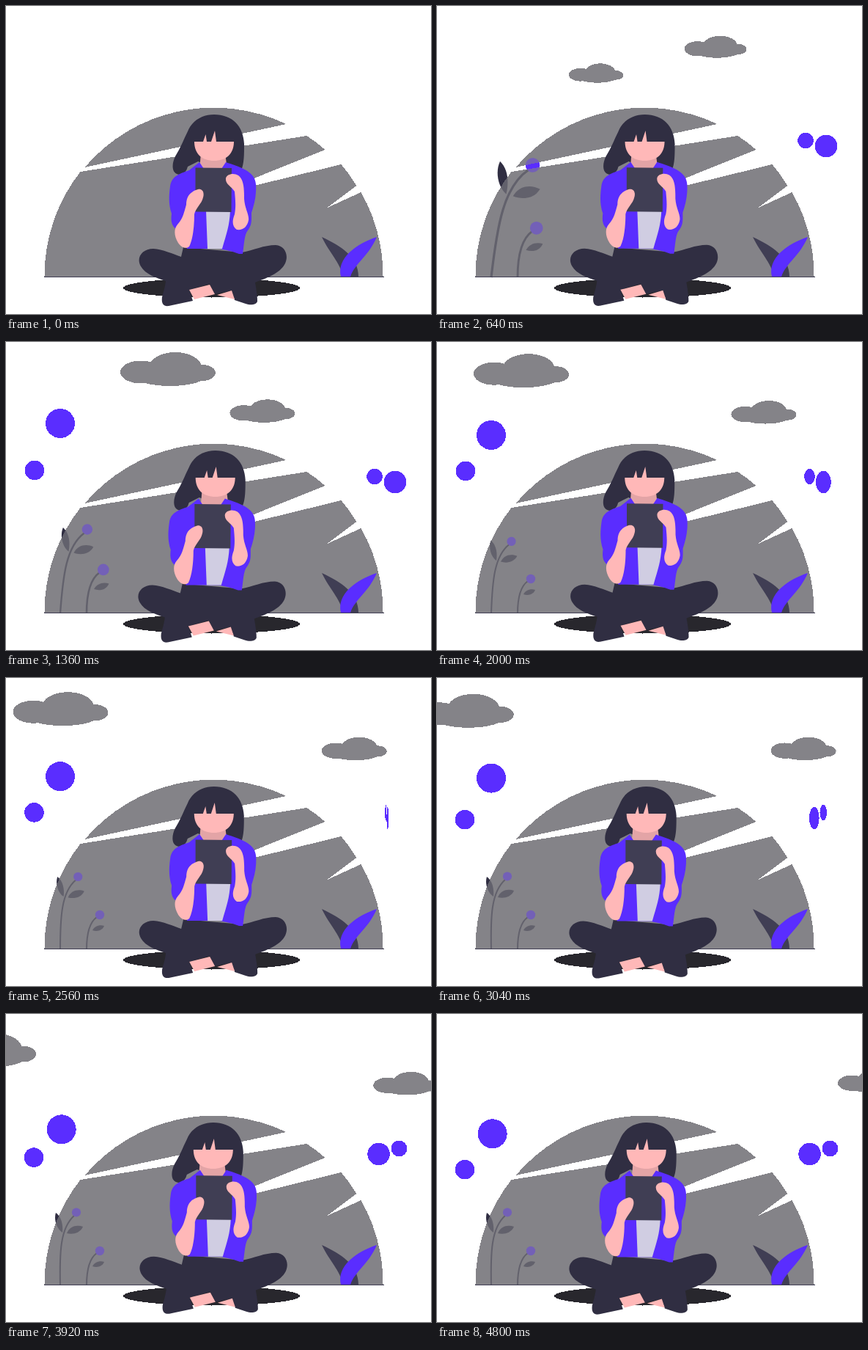
An HTML page for the animation above (4.88 s loop, 580x420 px).

```html
<!DOCTYPE html>
<html lang="en">
<head>
<meta charset="utf-8">
<title>Reading outdoors</title>
<style>
html, body { margin: 0; width: 100%; height: 100%; overflow: hidden; background: #fff; }
svg { display: block; width: 100vw; height: 100vh; }
.gray { fill: #848388; }
.violet { fill: #5a2dff; }
.dark { fill: #302e42; }
.slate { fill: #403e54; }
.skin { fill: #ffb8b8; }
.stem { fill: none; stroke: #302e42; stroke-width: 2; }
.crisp { shape-rendering: crispEdges; }
</style>
</head>
<body>
<svg viewBox="0 0 580 420" preserveAspectRatio="xMidYMid meet">
  <defs>
    <path id="hill" class="gray crisp" transform="translate(-.5 0)" d="M53 369.5A231 231 0 0 1 102 226L411 177A231 231 0 0 1 436 196L274 261L458 216A231 231 0 0 1 479 245L439 275L485 254A231 231 0 0 1 515 369.5ZM108 220A231 231 0 0 1 383 161Z"/>
    <g id="cloud" class="gray crisp">
      <ellipse cx="-37" cy="4" rx="28" ry="15.5"/>
      <ellipse cx="10" cy="-2" rx="36" ry="21"/>
      <ellipse cx="3" cy="8" rx="50" ry="15"/>
      <ellipse cx="47" cy="5" rx="18" ry="11"/>
    </g>
  </defs>

  <use id="cloudA" href="#cloud"/>
  <use id="cloudB" href="#cloud"/>

  <use href="#hill"/>
  <g id="tall">
    <path class="stem" d="M0 0C-1 -45 0 -78 19 -95"/>
    <path class="dark" d="M3 -72C-5 -77 -9 -90 -6 -99C2 -93 4 -82 3 -72Z"/>
    <path class="dark" d="M9 -71C13 -81 23 -83 31 -80C27 -71 17 -69 9 -71Z"/>
    <circle class="violet" cx="22" cy="-99.5" r="6.1"/>
  </g>
  <g id="short">
    <path class="stem" d="M0 0C0 -22 4 -37 14 -44"/>
    <path class="dark" d="M8 -26C11 -32 18 -34 24 -32C21 -25 14 -24 8 -26Z"/>
    <circle class="violet" cx="18" cy="-47" r="6.2"/>
  </g>
  <use href="#hill" opacity=".6"/>

  <path class="slate" d="M431 315C457 327 481 342 481 369H460C456 350 441 336 431 315Z"/>
  <path class="violet" d="M506 315C478 324 451 344 457 369H470C476 351 495 341 506 315Z"/>
  <path d="M52 369.5H516" stroke="#403e54"/>
  <ellipse class="crisp" cx="280.5" cy="384.5" rx="120.5" ry="13" fill="#28272d"/>

  <circle id="ballA" class="violet crisp" r="20"/>
  <circle id="ballB" class="violet crisp" r="13.3"/>
  <g id="pair" class="violet crisp">
    <circle cx="-16.7" cy="-4" r="10.8"/>
    <circle cx="11.2" cy="3.5" r="15.3"/>
  </g>

  <g id="body">
    <g id="head">
      <path class="dark" d="M284 148C309 148 324 164 325 188C325 203 325 215 321 224L300 226L262 212L248 219Q246 228 238 230C225 230 226 215 231 205C238 194 242 183 248 171C254 156 268 148 284 148Z"/>
      <path fill="#e3a4a6" d="M266 200H299L302 224H264Z"/>
      <path class="skin" d="M257 185H269L272.5 175L274 185H280L285 170L287 185H311C311 202 300 211 284 211C268 211 257 202 257 185Z"/>
    </g>
    <path class="dark" d="M242 329L322 336C338 333 352 326 368 326C381 327 386 340 381 351C374 365 355 371 340 377C342 388 343 396 343 403C341 408 333 408 327 406L312 401L308 388L284 393L278 379L250 387L255 402L222 409C214 410 212 405 213 397C215 389 217 384 218 375C206 371 190 366 184 355C177 343 186 331 201 331C214 332 228 338 239 342Z"/>
    <path class="skin" d="M250 387L278 380L285 393L257 400ZM288 394L308 388L312 400Z"/>
    <path class="violet" d="M264 213L282 240L300 213C318 219 340 225 341 243C342 258 339 270 335 282C335 292 336 298 330 306C325 312 325 326 323 338H318C308 334 300 333 292 331H247C242 320 240 310 232 304C225 299 225 291 226 283C222 272 222 260 224 246C226 232 236 229 250 224Z"/>
    <path class="skin" d="M264 219H301L303 224H262Z" fill-opacity="0"/>
    <path fill="#d0cde2" d="M273 279H306C305 300 301 310 295 331H275Z"/>
    <path class="slate" d="M258.5 220.5L308 221L307.5 281L258.5 280.5Z"/>
    <path class="skin" d="M262 250C268 249 271 254 269 261C267 270 259 275 257 284C257 301 255 318 250 328C245 332 239 329 235 323C229 313 229 304 234 298C242 289 243 281 246 271C246 259 252 253 262 250Z"/>
    <path class="skin" d="M300 235C301 229 311 227 317 231C325 237 325 250 325 263C326 277 332 284 331 292C329 302 323 306 315 305C309 301 308 294 312 284C314 273 313 264 312 253C308 246 299 243 300 235Z"/>
  </g>
</svg>
<script>
const LOOP = 4880, STEP = 80, SWAY = 1720;
const put = (id, x, y, sx = 1, sy = sx, rot = 0) =>
  document.getElementById(id).setAttribute('transform',
    `translate(${x} ${y}) rotate(${rot}) scale(${sx} ${sy})`);
const ramp = (t, a, b) => Math.max(0, Math.min(1, (t - a) / (b - a)));
const ease = (t, a, b) => { const u = ramp(t, a, b); return u * u * (3 - 2 * u); };

// Slowing entrance until 2 s, then a steady drift
function drift(t, x, speed, curve, slow) {
  const d = t - 2000;
  return x + (d < 0 ? speed * d + curve * d * d : slow * d);
}

function drawClouds(t) {
  const ay = 56 - 19 * ease(t, 600, 1140) + .0054 * Math.max(0, t - 1600);
  put('cloudA', drift(t, 115, -.1396, .0000406, -.0724), ay, ramp(t, 80, 940));
  const by = 91.5 + 5 * Math.sin(Math.PI * ramp(t, 640, 4800));
  put('cloudB', drift(t, 446, .1337, -.0000255, .052), by, .685 * ramp(t, 80, 750));
}

function drawBalls(t, wave) {
  const pop = ease(t, 640, 1120), fall = Math.max(0, t - 1360);
  const bob = fall ? 1 - wave : 0;
  put('ballA', 74 + 1.7 * ease(t, 3040, 3920), 111 + .0152 * fall + 3.7 * bob, pop);
  put('ballB', 39 - ease(t, 2000, 3040), 175 + .0108 * fall - 3.5 * bob, pop);

  const grow = ease(t, 80, 560);
  const flip = 1 - 2 * ease(t, 1340, 3940);
  put('pair', 519.8, 187.5, grow * flip, grow);
}

// Shoots overshoot, then settle to rest size
function drawPlants(t) {
  const grow = ease(t, 0, 560);
  const settle = (extra, from, to) => grow * (1 + extra * (1 - ease(t, from, to)));
  const tall = settle(.68, 300, 1900);
  put('tall', 74, 370, tall, tall, Math.max(0, 10 - .0034 * t));
  put('short', 110, 370, settle(.43, 900, 2000));
}

function draw(t) {
  const wave = Math.cos(2 * Math.PI * (t - 1360) / SWAY);
  drawClouds(t);
  drawBalls(t, wave);
  drawPlants(t);
  const lean = (.15 + .85 * wave) * ease(t, 0, 1360);
  put('body', -1.2 * lean, .5 * lean);
  put('head', 2.9 * lean, -.4 * lean);
}

const start = performance.now();
function tick() {
  const t = (performance.now() - start) % LOOP;
  draw(Math.floor(t / STEP) * STEP);
  requestAnimationFrame(tick);
}
tick();
</script>
</body>
</html>
```
